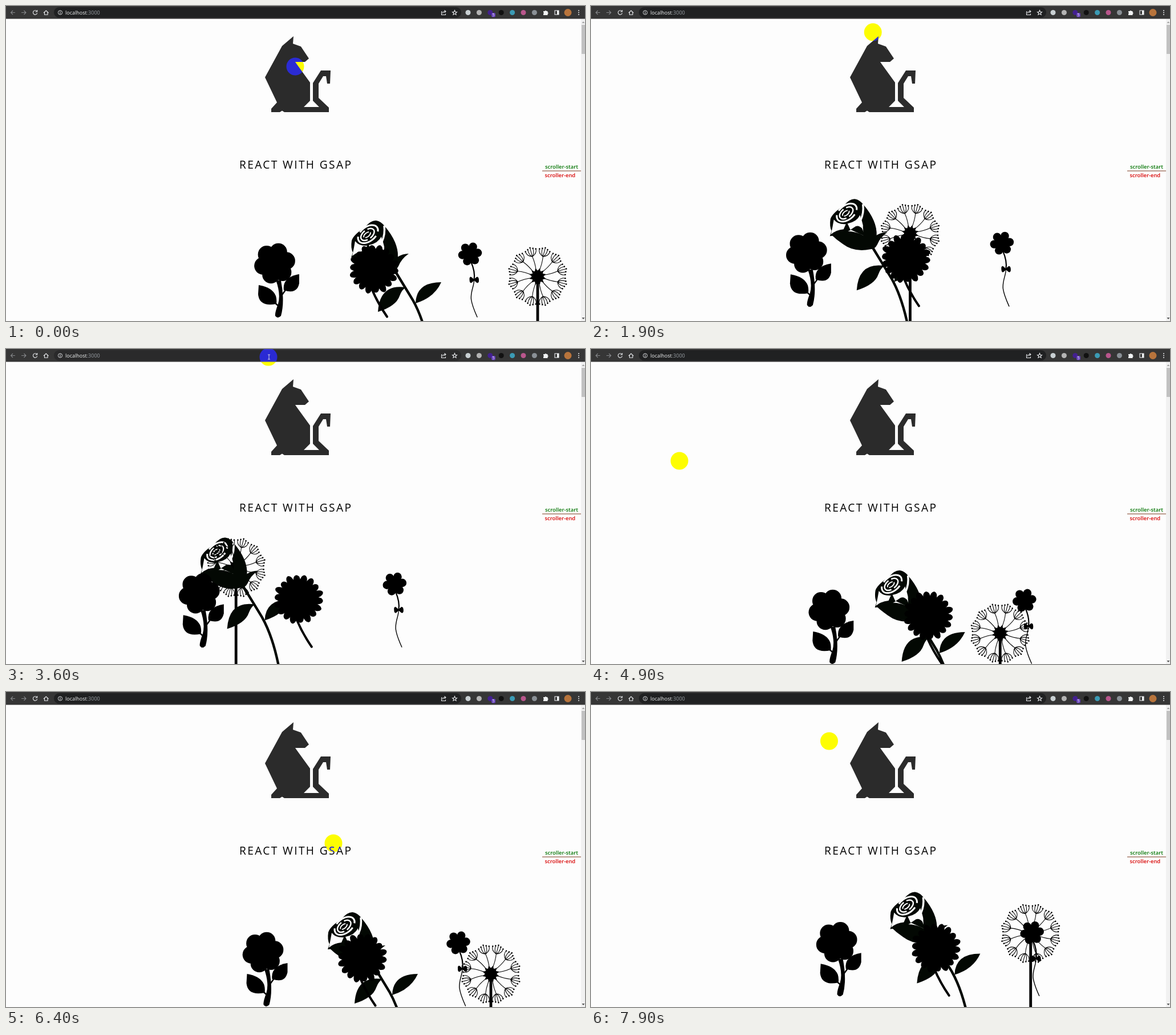
Write an HTML page that moves like this. It is 1015 by 552 pixels and loops after 8000 ms.

```html
<!DOCTYPE html>
<html lang="en">
<head>
<meta charset="utf-8">
<title>Parallax flowers</title>
<style>
  html, body { margin: 0; width: 100%; height: 100%; overflow: hidden; background: #fdfdfd; }
  svg { display: block; width: 100%; height: 100%; isolation: isolate; }
  text { font-family: "Open Sans", "Noto Sans", sans-serif; white-space: pre; }
  .line { fill: none; stroke: #e8eaed; stroke-width: 1.1; }
  .dim { stroke: #85878a; }
  .stem { fill: none; stroke: #000; stroke-linecap: round; }
  #pointer { fill: #00f; mix-blend-mode: difference; }
</style>
</head>
<body>
<svg viewBox="0 0 1015 552">
  <defs>
    <mask id="petals" maskUnits="userSpaceOnUse" x="590" y="365" width="130" height="115">
      <rect x="590" y="365" width="130" height="115" fill="#fff"/>
      <path d="M607 438 Q610 424 612 412 Q619 421 633 420 L629 429 Q616 430 607 438Z"/>
      <path d="M636 419 Q652 416 658 404 L663 429 Q656 421 650 424 L641 430Z"/>
      <path d="M663 385 Q665 400 659 413 Q661 424 666 434" fill="none" stroke="#000" stroke-width="3.5"/>
      <g id="swirl" transform="translate(633 401) rotate(-38)" fill="none" stroke="#000"/>
    </mask>
  </defs>

  <rect width="1015" height="552" fill="#fdfdfd"/>

  <path fill="#2b2b2b" d="M504 53 L484 70 L454 125 L475 169 L465 180 V186 H480 L484 183.5 L488 186 H566 V178 L548 161 V136 L556 123 H561 L563 136 H568 L569 113 H552 L538 135 V166 L549 177 H522 L533 166 V134 L507 98 H524 L531 92 L517 71 L503 66Z"/>

  <text x="409" y="285.3" font-size="19.2" letter-spacing="2.35">REACT WITH GSAP</text>

  <g id="dandelion"></g>

  <g id="rose" fill="#030803">
    <path mask="url(#petals)" d="M649 376 Q640 375 630 387 Q609 401 606 411 Q604 424 608 432 L605 441 Q625 440 642 430 L664 440 L687 440 Q688 414 664 386 Q657 377 649 376Z"/>
    <path d="M607 438 Q640 426 664 440 L663 425 Q664 403 668 393 Q689 420 686 440 Q695 434 706 434 Q693 443 688 456 Q684 464 676 464 Q648 470 628 455 Q616 447 607 438Z"/>
    <path class="stem" style="stroke:#030803" stroke-width="4.4" d="M680 461 L713 515 Q734 552 745 615"/>
    <path d="M701 493 Q655 486 652 536 Q684 526 690 508 Q694 497 701 493Z"/>
    <path d="M718 521 Q719 484 763 484 Q751 511 718 521Z"/>
  </g>

  <g id="near">
    <g id="round">
      <path d="M473 480 Q482 505 477 522 Q471 538 472 543 Q476 549 482 543 Q489 518 482 481Z"/>
      <path d="M443 489 Q467 493 473 508 Q475 514 474 522 Q444 528 442 505Z"/>
      <path d="M514 470 Q484 475 487 498 Q510 506 514 486Z"/>
      <path class="stem" stroke-width="2.4" d="M470 519 L478 526 M492 495 L484 506"/>
    </g>
    <g id="daisy">
      <path class="stem" stroke-width="4" d="M641 495 Q651 520 668 544.5"/>
    </g>
    <g id="small">
      <path class="stem" stroke-width="2.2" d="M815 448 Q823 466 820.5 480"/>
      <path class="stem" stroke-width="1.4" d="M820.5 480 C821 490 814 500 815.5 514 Q817 525 826 545"/>
      <path d="M820.5 480 Q812 470 813 480 Q813 490 820.5 480 Q829 490 828.5 480 Q828 470 820.5 480Z" stroke="#000"/>
    </g>
  </g>

  <g font-size="9.4" font-weight="600">
    <text x="945" y="285" fill="#007300">scroller-start</text>
    <text x="944.5" y="300" fill="#d80000">scroller-end</text>
    <path d="M940 289 H1008" stroke="#7d3a20" stroke-width="1.2"/>
  </g>

  <rect x="1008" y="23" width="7" height="529" fill="#f1f1f1"/>
  <rect x="1009" y="33" width="6" height="51" fill="#c1c1c1"/>
  <path d="M1009.5 30 L1012 27 L1014.5 30Z" fill="#a3a3a3"/>
  <path d="M1009.5 546 L1012 549 L1014.5 546Z" fill="#505050"/>

  <rect width="1015" height="22.5" fill="#363636"/>
  <rect id="address" x="84" y="2" width="714" height="18.5" rx="9.2"/>
  <g class="line">
    <path class="dim" d="M16 11.5 H8.5 M12 8 L8.5 11.5 L12 15 M27 11.5 H35 M31.5 8 L35 11.5 L31.5 15"/>
    <path d="M54 9 A3.7 3.7 0 1 0 54.7 12.5 M54.7 7 V10 H51.7"/>
    <path d="M66 12 L70.2 8 L74.4 12 M67.5 11 V15.2 H73 V11"/>
    <circle cx="95" cy="11.5" r="3.6" stroke-width=".9"/>
    <path d="M95 11 V13.5 M95 9.3 V10.2"/>
    <path d="M765 10 H763.5 V15.5 H770.5 V13.5 M765.5 13 Q766 9.5 770 9.5 M768.5 7.5 L771 9.5 L768.5 11.8"/>
    <path d="M786.5 7.5 L787.6 10.2 L790.5 10.4 L788.3 12.3 L789 15.2 L786.5 13.6 L784 15.2 L784.7 12.3 L782.5 10.4 L785.4 10.2Z"/>
    <rect x="962" y="8" width="7" height="7"/>
  </g>
  <path d="M966 8 H969 V15 H966Z M942 9 H944.5 A1.6 1.6 0 0 1 947.5 9 H949.5 V11 A1.6 1.6 0 0 1 949.5 14 V16 H942 V13.5 A1.4 1.4 0 0 0 942 11Z" fill="#f1f3f4"/>
  <text x="104" y="14.5" font-size="9" fill="#f1f3f4">localhost<tspan fill="#9aa0a6">:3000</tspan></text>
  <g id="extensions"></g>
  <rect x="851" y="12" width="7" height="7.5" rx="2" fill="#6540b8"/>
  <text x="852.6" y="18.3" font-size="6.5" fill="#fff">5</text>

  <circle id="pointer" r="15.5"/>
  <path id="beam" d="M-2 -4 H2 M0 -4 V4 M-2 4 H2" stroke="#e4e4e4" stroke-width=".9" fill="none"/>
</svg>
<script>
const LOOP = 8000, STEP = 100;
const $ = id => document.getElementById(id);

function add(parent, tag, attrs) {
  const node = document.createElementNS('http://www.w3.org/2000/svg', tag);
  for (const key in attrs) node.setAttribute(key, attrs[key]);
  return parent.appendChild(node);
}
const dot = (parent, cx, cy, r, fill = '#000') => add(parent, 'circle', { cx, cy, r, fill });

// A disc with a ring of round petals
function blossom(parent, cx, cy, ring, petal, turn) {
  dot(parent, cx, cy, ring);
  for (let i = 0; i < 6; i++) {
    const a = (turn + i * 60) * Math.PI / 180;
    dot(parent, cx + ring * Math.cos(a), cy + ring * Math.sin(a), petal);
  }
}
blossom($('round'), 471, 451, 21, 15.3, -72);
blossom($('small'), 813.5, 434.5, 13.6, 7.3, -8);

// Toolbar buttons
['#c9d0d3', '#b4b4b4', '#43208f', '#111', '#3b9bb5', '#b9568c', '#8a9096']
  .forEach((fill, i) => dot($('extensions'), 810 + 19.4 * i, 11.5, 4.5, fill));
dot($('extensions'), 985, 11.5, 6.5, '#b8743c');
for (let i = -1; i <= 1; i++) dot($('extensions'), 1004, 11.5 + 3.5 * i, 1, '#e8eaed');

// Rose swirl: nested broken ovals
for (let i = 0; i < 3; i++) {
  add($('swirl'), 'ellipse', {
    cx: i, rx: 7 + 6.5 * i, ry: 3.5 + 4.5 * i, 'stroke-width': 2 + i * .5,
    pathLength: 100, 'stroke-dasharray': '42 8', 'stroke-dashoffset': i * 17
  });
}

// Daisy: pointed petals around a disc
dot($('daisy'), 645, 461, 34);
for (let i = 0; i < 18; i++) {
  const tip = 43 + 1.5 * Math.sin(i * 2.7);
  add($('daisy'), 'path', {
    d: `M20 -7 L35 -6 Q${tip} -5 ${tip} 0 Q${tip - 1} 5 35 6 L20 7Z`,
    transform: `translate(645 461) rotate(${i * 20 + 5})`
  });
}

// Dandelion: spokes ending in fans of hairs
const dandelion = $('dandelion');
add(dandelion, 'path', { d: 'M932 474 V720', stroke: '#000', 'stroke-width': 4.8 });
dot(dandelion, 932, 474, 10.5);
for (let i = 0; i < 12; i++) {
  const spoke = add(dandelion, 'g', { transform: `translate(932 474) rotate(${i * 30 + 15})` });
  add(spoke, 'path', { d: 'M8 -3.5 L15 0 L8 3.5Z' });
  let d = 'M10 0 Q24 2 36 0';
  for (let h = -2; h <= 2; h++) {
    const x = 52 - Math.abs(h) * 2.2, y = h * 4.7;
    d += `M36 0 Q40 ${h * 5} ${x} ${y}`;
    dot(spoke, x, y, 1.3);
  }
  add(spoke, 'path', { d, class: 'stem', 'stroke-width': 1.05 });
}

// Key points: time, x, y
const pointerPath = [
  [0, 507, 106], [400, 510, 14], [900, 484, 14], [1500, 484, 14], [2600, 519, 123],
  [3200, 440, 14], [3600, 460, 14], [4150, 460, 14], [4900, 155, 196], [5100, 109, 186],
  [6400, 574, 265], [6800, 24, 169], [7100, 15, 165], [LOOP, 430, 83.6]
];
const shiftPath = [
  [0, 0, 0], [400, 0, -6], [850, -135.5, -23], [1500, -135.5, -23], [2550, -2, -10],
  [3200, -26, -14], [3650, -135.5, -23], [4150, -135.5, -23], [4600, 0, 0], [5150, -94, 10.5],
  [6400, -20.5, 5], [6550, -5, 5], [7250, -105, -6], [LOOP, -37.4, -13]
];

function at(path, t) {
  const i = Math.max(1, path.findIndex(key => key[0] >= t));
  const [t0, x0, y0] = path[i - 1], [t1, x1, y1] = path[i];
  const k = (1 - Math.cos(Math.PI * (t - t0) / (t1 - t0))) / 2;
  return [x0 + (x1 - x0) * k, y0 + (y1 - y0) * k];
}
const move = (id, x, y) => $(id).setAttribute('transform', `translate(${x} ${y})`);

const start = performance.now();
function draw(now) {
  const t = Math.floor(Math.max(0, now - start) % LOOP / STEP) * STEP;
  const [px, py] = at(pointerPath, t), [sx, sy] = at(shiftPath, t);
  const overBar = py < 23;
  ['near', 'rose', 'dandelion'].forEach((id, i) => move(id, sx * 2 ** i, sy * 2 ** i));
  move('pointer', px, py);
  move('beam', px + 1, py);
  $('beam').style.display = overBar ? '' : 'none';
  $('address').style.fill = overBar ? '#2a2a2b' : '#202122';
  requestAnimationFrame(draw);
}
draw(start);
</script>
</body>
</html>
```
